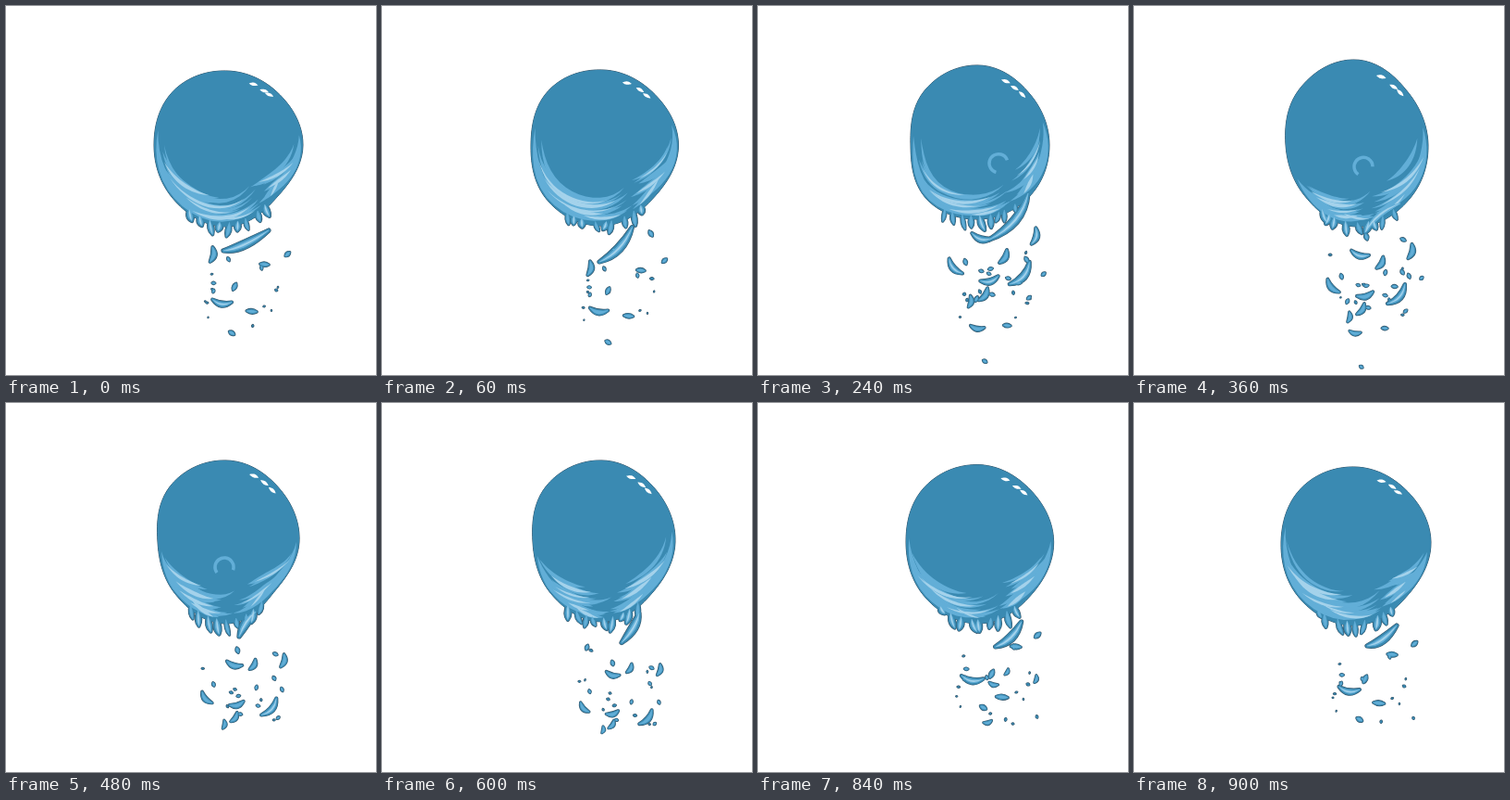
Recreate the animation shown at these times as an HTML page with a canvas. Size 400 px wide and 398 px high, loop 960 ms.

```html
<!DOCTYPE html>
<html lang="en">
<head>
<meta charset="utf-8">
<title>Water drop</title>
<style>
html, body { margin: 0; width: 100%; height: 100%; overflow: hidden; background: #fff; }
canvas { display: block; width: 400px; height: 398px; }
</style>
</head>
<body>
<canvas id="stage" width="400" height="398"></canvas>
<script>
const ctx = document.getElementById('stage').getContext('2d');
const STEP = 60, STEPS = 16, LIFE = 11;
const CX = 240, CY = 150;
const WATER = '#3a8ab2', MID = '#62aed7', PALE = '#a4d2eb', EDGE = '#34556a';

// radii: every 45 degrees clockwise from the right.
// flow: angles where the left and right currents start, and where they meet.
// tail: start, control and end of the stream that leaves the ball.
const poses = [
  { at: 0, radii: [81, 77, 88, 83, 80, 83, 80, 78], flow: [192, -8, 62], tail: [284, 242, 255, 262, 235, 264] },
  { at: 2, radii: [80, 79, 86, 88, 78, 85, 82, 77], flow: [196, -25, 68], tail: [257, 235, 263, 270, 235, 288] },
  { at: 4, radii: [75, 77, 80, 82, 75, 84, 86, 77], flow: [188, -20, 62], tail: [292, 202, 285, 235, 250, 252] },
  { at: 6, radii: [78, 82, 88, 78, 76, 86, 92, 80], flow: [150, -15, 75], tail: [288, 213, 262, 222, 250, 244] },
  { at: 8, radii: [77, 73, 88, 80, 76, 87, 88, 80], flow: [172, 0, 86], tail: [270, 225, 258, 235, 252, 252] },
  { at: 12, radii: [77, 78, 84, 80, 78, 87, 88, 79], flow: [165, -18, 85], tail: [286, 228, 292, 250, 266, 265] },
  { at: 15, radii: [81, 80, 90, 86, 81, 83, 81, 78], flow: [192, 8, 68], tail: [284, 240, 268, 260, 252, 262] }
];
poses.push({ ...poses[0], at: STEPS });

// Large drops: step of birth, x, y, drift, fall, length, tilt in degrees
const drops = [
  [12, 243, 298, 3, 92, 8, 30], [12, 230, 268, 10, 84, 27, 8], [2, 282, 260, 4, 85, 36, -48],
  [2, 212, 254, 10, 80, 24, 48], [0, 222, 268, 18, 85, 16, -80], [2, 242, 291, 8, 60, 18, -55],
  [4, 250, 294, -2, 50, 20, -15], [4, 242, 248, 14, 55, 22, 15], [4, 298, 248, 2, 50, 18, -75],
  [12, 262, 302, 10, 46, 14, 5], [12, 278, 243, 4, 60, 12, 5], [12, 300, 229, 12, 65, 8, -40],
  [12, 258, 279, -30, 40, 10, -65], [4, 265, 270, 4, 20, 16, -60]
];

const lerp = (a, b, k) => a + (b - a) * k;
const mix = (a, b, k) => a.map((v, i) => lerp(v, b[i], k));

function seeded(seed) {
  let s = seed * 7919 + 17;
  return () => (s = s * 16807 % 2147483647) / 2147483647;
}

function poseAt(step) {
  const i = poses.findLastIndex(p => p.at <= step);
  const from = poses[i], to = poses[i + 1], k = (step - from.at) / (to.at - from.at);
  return {
    radii: mix(from.radii, to.radii, k),
    flow: mix(from.flow, to.flow, k),
    tail: mix(from.tail, to.tail, k)
  };
}

// Catmull-Rom through the radii, wrapped around the circle
function radiusAt(radii, deg) {
  const pos = (deg + 360) % 360 / 45, i = Math.floor(pos), t = pos - i;
  const [a, b, c, d] = [7, 0, 1, 2].map(o => radii[(i + o) % 8]);
  return b + t / 2 * (c - a + t * (2 * a - 5 * b + 4 * c - d + t * (3 * (b - c) + d - a)));
}

function polar(radii, deg, depth) {
  const r = radiusAt(radii, deg) * depth, a = deg * Math.PI / 180;
  return [CX + r * Math.cos(a), CY + r * Math.sin(a)];
}

function polygon(points) {
  const path = new Path2D();
  for (const p of points) path.lineTo(...p);
  path.closePath();
  return path;
}

// Tapered spiral band inside the ball, from one angle and depth to another
function ribbon(radii, a0, d0, a1, d1, width) {
  const outer = [], inner = [];
  for (let i = 0; i <= 16; i++) {
    const u = i / 16, half = width / 2 * Math.sin(Math.PI * u);
    const a = lerp(a0, a1, u), d = lerp(d0, d1, u);
    outer.push(polar(radii, a, d + half));
    inner.unshift(polar(radii, a, d - half));
  }
  return polygon([...outer, ...inner]);
}

// Tapered curve, thickest in the middle
function lens([x0, y0, cx, cy, x1, y1, w], scale) {
  const len = Math.hypot(x1 - x0, y1 - y0);
  const nx = (y0 - y1) / len * w * scale, ny = (x1 - x0) / len * w * scale;
  const path = new Path2D();
  path.moveTo(x0, y0);
  path.quadraticCurveTo(cx + nx, cy + ny, x1, y1);
  path.quadraticCurveTo(cx - nx, cy - ny, x0, y0);
  path.closePath();
  return path;
}

function paint(path, color, width) {
  ctx.fillStyle = ctx.strokeStyle = color;
  ctx.fill(path);
  if (width) {
    ctx.lineWidth = width;
    ctx.stroke(path);
  }
}

// A falling drop slows down and shrinks towards the end of its life
function fallingDrop([born, x, y, drift, fall, length, tilt], step) {
  const u = (step - born + STEPS) % STEPS / LIFE;
  if (u >= 1) return [];
  const a = tilt * Math.PI / 180, half = length / 2 * (1 - u * .6);
  const dx = half * Math.cos(a), dy = half * Math.sin(a), bend = length > 15 ? half * .7 : 0;
  const px = x + drift * u, py = y + fall * u * (2 - u);
  const width = Math.min(length * .8, 5 + length * .12) * (1 - u * .4);
  return [[px - dx, py - dy, px - Math.sin(a) * bend, py + Math.cos(a) * bend, px + dx, py + dy, width]];
}

function specks() {
  const rnd = seeded(5);
  return Array.from({ length: 26 }, () =>
    [rnd() * STEPS, lerp(210, 298, rnd()), lerp(236, 290, rnd()), lerp(-6, 6, rnd()), 60, 2 + rnd() * 5, rnd() * 180]);
}

function skirt(radii, rnd) {
  return Array.from({ length: 9 }, (_, i) => {
    const [x, y] = polar(radii, 58 + i * 7.5 + rnd() * 4, .95);
    const dx = rnd() * 10 - 4, dy = 8 + rnd() * 9;
    return [x, y, x + dx * .2, y + dy * .6, x + dx, y + dy, 5 + rnd() * 4];
  });
}

function drawCurrents({ radii, flow: [left, right, seam] }, rnd) {
  const sides = [[left, 10], [right, 6]];
  const pale = [];
  for (const [start, count] of sides) {
    const span = seam - start;
    paint(ribbon(radii, start, .96, seam, .88, .12), MID);
    for (let i = 0; i < count; i++) {
      const k = i / count, a0 = start + span * (k * .6 + rnd() * .15);
      const a1 = lerp(a0, seam, .65 + rnd() * .4);
      const d0 = .95 - rnd() * .1, d1 = lerp(.6, .93, k) + rnd() * .05, width = .04 + rnd() * .05;
      paint(ribbon(radii, a0, d0, a1, d1, width), MID);
      if (i % 2) pale.push(ribbon(radii, lerp(a0, a1, .12), d0, lerp(a0, a1, .85), d1 + .01, width * .6));
    }
  }
  for (const p of pale) paint(p, PALE);
}

// Small eddy that drifts left across the ball
function drawEddy(step) {
  if (step < 2 || step > 8) return;
  const k = (step - 2) / 6;
  ctx.strokeStyle = MID;
  ctx.lineWidth = 3.5;
  ctx.beginPath();
  ctx.arc(lerp(272, 236, k), lerp(166, 177, k), 10, 1.5 + k, 5.6 + k);
  ctx.stroke();
}

function drawShine(radii, rnd) {
  for (const a of [-74, -63, -55]) {
    const start = a + rnd() * 3;
    paint(ribbon(radii, start, .88 + rnd() * .03, start + 8, .92, .045), '#fff');
  }
}

const pieces = [...drops, ...specks()];

function draw(step) {
  const pose = poseAt(step), rnd = seeded(step + 1);
  const body = polygon(Array.from({ length: 90 }, (_, i) => polar(pose.radii, i * 4, 1)));
  const splashes = [
    [...pose.tail, 10],
    ...skirt(pose.radii, rnd),
    ...pieces.flatMap(p => fallingDrop(p, step))
  ];

  ctx.clearRect(0, 0, 400, 398);
  ctx.lineJoin = 'round';
  paint(body, EDGE, 1);
  for (const s of splashes) paint(lens(s, .6), EDGE, s[6] * .4 + 1.2);
  paint(body, WATER);
  for (const s of splashes) paint(lens(s, .6), WATER, s[6] * .4);

  ctx.save();
  ctx.clip(body);
  drawCurrents(pose, rnd);
  drawEddy(step);
  drawShine(pose.radii, rnd);
  ctx.restore();

  for (const s of splashes) if (s[6] > 3) paint(lens(s, .5), MID, s[6] * .1);
  for (const s of splashes) if (s[6] > 7) paint(lens(s, .22), PALE);
}

function tick() {
  draw(Math.floor(performance.now() / STEP) % STEPS);
  requestAnimationFrame(tick);
}
tick();
</script>
</body>
</html>
```
